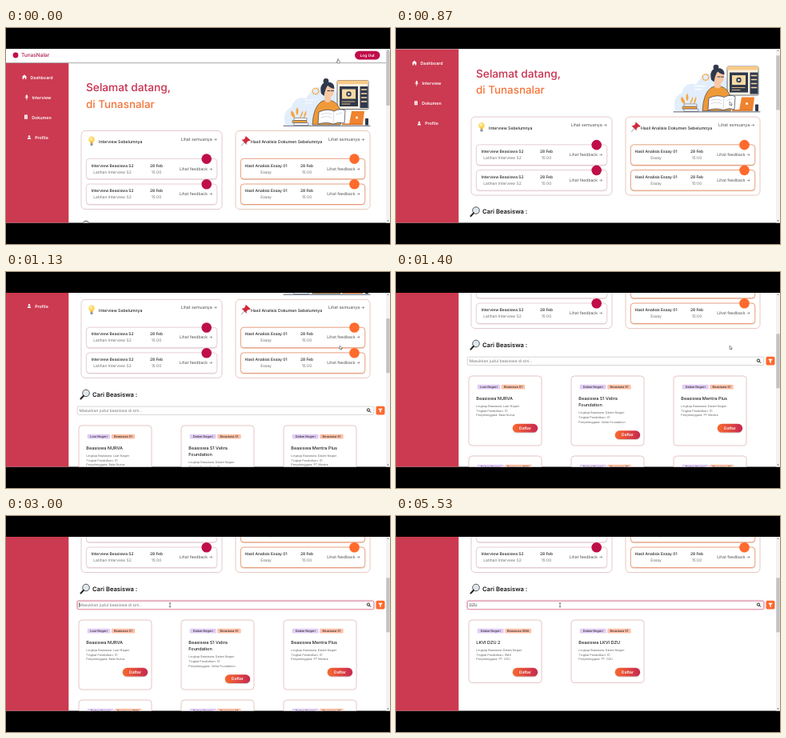
Animation of 480 by 270 pixels, one loop 5.59 s. Source, as an HTML page:

```html
<!DOCTYPE html>
<html lang="id">
<head>
<meta charset="utf-8">
<title>Dasbor beasiswa</title>
<style>
html, body { margin: 0; width: 100%; height: 100%; overflow: hidden; background: #000; }
svg { display: block; width: 100vw; height: 100vh; }
text { font-family: Inter, "Open Sans", sans-serif; text-rendering: geometricPrecision; white-space: pre; }
</style>
</head>
<body>
<svg id="stage" viewBox="0 0 480 270"></svg>
<script>
const LOOP = 5590;
const STEP = 1000 / 15;
const CRIMSON = '#bf0e48', ORANGE = '#fb6930', INK = '#222', GREY = '#707070', NAVY = '#30394c';

const attrs = o => Object.entries(o).map(([k, v]) => ` ${k}="${v}"`).join('');
const rect = (x, y, width, height, fill, more = {}) =>
  `<rect${attrs({ x, y, width, height, fill, ...more })}/>`;
const circle = (cx, cy, r, fill, more = {}) => `<circle${attrs({ cx, cy, r, fill, ...more })}/>`;
const path = (d, fill, more = {}) => `<path${attrs({ d, fill, ...more })}/>`;
const line = (d, stroke, width = 0.8, more = {}) =>
  path(d, 'none', { stroke, 'stroke-width': width, 'stroke-linecap': 'round', ...more });
// y is the optical middle of the line of text
const text = (x, y, str, size, fill = INK, weight = 400, anchor = 'start') =>
  `<text${attrs({ x, y: y + size * 0.36, fill, 'font-size': size, 'font-weight': weight, 'text-anchor': anchor })}>${str}</text>`;
const mid = (x, y, str, size, fill, weight) => text(x, y, str, size, fill, weight, 'middle');
const box = (x, y, w, h, rx, stroke, width = 0.7) =>
  rect(x, y, w, h, '#fff', { rx, stroke, 'stroke-width': width });

function header() {
  return rect(0, 26, 475, 17.3, '#fff') + rect(0, 43, 475, 0.9, '#a8a8a8') + rect(78.3, 43.9, 397, 0.8, '#ececec') +
    circle(12, 34, 3.4, CRIMSON) + text(19, 34, 'TunasNalar', 6.5, '#a8174a', 500) +
    rect(436, 28.8, 31.5, 10.6, CRIMSON, { rx: 5.3 }) + mid(451.7, 34, 'Log Out', 4.8, '#fff', 600);
}

function sidebar() {
  const item = (x, y, label) => mid(x, y, label, 5.3, '#fff', 600);
  return rect(0, 43.8, 78.3, 500, '#cb3a50') +
    path('M19.8 61.3L23 58.3L26.2 61.3H25.3V64H23.8V62H22.2V64H20.7V61.3Z', '#fff') +
    item(44.5, 62, 'Dashboard') +
    rect(24.7, 83.4, 2.2, 4.2, '#fff', { rx: 1.1 }) +
    line('M23.9 86.6Q25.8 90 27.7 86.6M25.8 88.4V89.8', '#fff', 0.6) + item(44.5, 87, 'Interview') +
    rect(23, 108.6, 4, 5.2, '#fff', { rx: 0.5 }) + line('M24.2 110.2H26M24.2 112H26', '#cb3a50', 0.5) +
    item(44.5, 112, 'Dokumen') +
    circle(29, 135.4, 1.2, '#fff') + path('M26.8 139Q27 136.8 29 136.8Q31 136.8 31.2 139Z', '#fff') +
    item(44.5, 137, 'Profile');
}

function illustration() {
  const book = (x, y, w, fill) =>
    rect(x, y, w, 3, fill, { rx: 0.6, stroke: NAVY, 'stroke-width': 0.5 });
  const leaf = (x, y, lean) =>
    path(`M${x} ${y}q${lean - 3} -4 ${lean} -10q${3 - lean / 2} 5 ${-lean} 10Z`, '#f5a53c');
  return path('M349 121Q345 104 357 99Q361 84 375 88Q386 70 401 74Q420 78 420 100L418 122Z', '#e2eefb') +
    rect(414, 65.5, 39, 36, '#fbf1df', { rx: 1.5, stroke: NAVY, 'stroke-width': 0.7 }) +
    rect(414, 65.5, 39, 4.5, '#f8c987', { rx: 1 }) +
    rect(417, 73, 23, 25, NAVY) + rect(420, 76.5, 17, 12, '#f8d9a4') +
    circle(428.5, 82.5, 3.2, NAVY) + path('M427.5 80.8L430.6 82.5L427.5 84.2Z', '#fff') +
    line('M420 92H436M420 95H430', '#f8c987', 0.9) +
    rect(442.5, 73, 10, 27, NAVY) + line('M444.5 77H450.5M444.5 82H450.5M444.5 87H450.5M444.5 92H450.5', '#f8d9a4', 1.6) +
    circle(387, 79, 3.8, 'none', { stroke: '#f5a53c', 'stroke-width': 1.6, 'stroke-dasharray': '1.8 .7' }) +
    line('M374 90H386M374 94H382', '#fff', 1.2) +
    leaf(361, 113, -4) + leaf(364, 109, 0) + leaf(367, 113, 4) + leaf(372, 113, 3) +
    book(360, 112.5, 16, '#fff') + book(358, 115.6, 18, '#f5a53c') + book(360, 118.7, 18, '#fff') +
    path('M383 121Q384 99 394 92Q402 88 410 92Q418 97 420 112L418 121Z', '#ef9a38', { stroke: NAVY, 'stroke-width': 0.6 }) +
    path('M398 84H406V91Q402 95 398 91Z', '#f9c8a4') +
    path('M396 76Q396 69 403 69Q410 69 410 77Q410 86 404 87Q397 86 396 76Z', '#f9c8a4') +
    circle(400, 66.5, 3.4, NAVY) +
    path('M394 82Q391 69 401 67.5Q411 67 410.5 76Q405 75 402 72Q399 76 397.5 85Z', NAVY) +
    line('M402 78.5H405M406.5 78.5H409.5', NAVY, 1) +
    path('M391 105Q402 100 410 104Q417 100 424 103L423 119Q416 117 409 120Q401 117 390 120Z', '#fff', { stroke: NAVY, 'stroke-width': 0.7 }) +
    line('M410 104L409 120M394 108Q401 105 407 108M394 112Q401 109 407 112M413 108L420 106', '#a9b4c6', 0.5) +
    path('M432 104H448L446 120H429Z', '#f0832e') + circle(438.5, 112, 1.5, '#fff') +
    rect(420, 119.4, 26, 1.8, '#d9742a') + rect(449, 113, 4, 8.4, NAVY, { rx: 0.6 }) +
    line('M347 122.3H455', NAVY, 0.8);
}

function panel(p) {
  const row = y => rect(p.x + 6.3, y + 0.8, p.w - 12.5, 26, p.shade, { rx: 4, opacity: 0.5 }) +
    box(p.x + 6.3, y, p.w - 12.5, 25.5, 4, p.edge, p.edgeWidth) +
    mid(p.col, y + 8.5, p.name, 4.95, INK, 500) + mid(p.col, y + 16.5, p.kind, 4.95, GREY) +
    mid(p.date, y + 8.5, '28 Feb', 4.95, INK, 500) + mid(p.date, y + 16.5, '15:00', 4.95, GREY) +
    mid(p.more, y + 12.4, 'Lihat feedback →', 5.05, '#505050') + circle(p.dot, y + 0.3, 6.3, p.fill);
  return box(p.x, 128.5, p.w, 98, 5, p.frame) +
    text(p.titleX, 142.6, p.title, 5.15, INK, 500) + mid(p.more + 3.8, 138.6, 'Lihat semuanya →', 5.3, '#505050') +
    row(163.3) + row(195);
}

function icons() {
  return circle(107, 139.4, 3.8, '#ffd968') + circle(106, 138.2, 1.5, '#fff3b8') +
    path('M105 142H109L108.5 144H105.5Z', '#f2b93c') + rect(105.4, 144, 3.2, 3, '#8b98a5', { rx: 0.8 }) +
    line('M298.5 142.5L294.5 147', '#7d8790', 0.8) +
    path('M300 135.2L305.6 140.2L304 141.5L302.8 141L300.6 143.4L300.8 146L294.4 139.6L297 139.5L299.4 137.2L299 136Z', '#cf2a3c') +
    circle(100, 245.5, 4.3, '#dfe8ee', { stroke: '#555', 'stroke-width': 1 }) +
    line('M97 248.8L93.4 252.6', '#222', 2);
}

function searchBar() {
  return rect(89, 262, 371, 10.6, '#f0537f', { id: 'glow', rx: 2, filter: 'url(#soft)' }) +
    box(89.2, 262.2, 370.6, 10.3, 1.5, '#bbb', 0.6) +
    rect(89.2, 262.2, 370.6, 10.3, 'none', { id: 'focusEdge', rx: 1.5, stroke: '#e58aa4', 'stroke-width': 0.8 }) +
    `<g id="hint">${text(91.5, 267.2, 'Masukkan judul beasiswa di sini...', 4.95, '#777')}</g>` +
    `<g id="query">${text(91.5, 267.2, '', 4.8, INK)}</g>` +
    rect(91.5, 264.2, 0.6, 6, '#111', { id: 'caret' }) +
    circle(453, 266.6, 1.7, 'none', { stroke: '#111', 'stroke-width': 0.9 }) + line('M454.4 268L455.8 269.4', '#111', 1) +
    rect(462.5, 261.8, 11, 10.8, ORANGE, { rx: 1.8 }) +
    path('M465.3 264.8H470.7L468.7 267.4V270.2L467.3 269.2V267.4Z', '#fff');
}

function card(x, y, h, { region, level, title, host }) {
  const wide = region === 'Dalam' ? 33 : 28.5;
  const badge = level === 'SMA' ? 33 : 29.5;
  const tagX = x + 10.7;
  const drop = (title.length - 1) * 8.5;
  const tag = (left, w, fill, label) =>
    rect(left, y + 10.8, w, 5.8, fill, { rx: 1.2 }) + mid(left + w / 2, y + 13.7, label, 3.9, '#333', 500);
  const details = [`Lingkup Beasiswa: ${region} Negeri`, `Tingkat Pendidikan: ${level}`, `Penyelenggara: ${host}`];
  return box(x, y, 91, h, 4, '#d9b0ae') +
    tag(tagX, wide, '#e1cdf6', `${region} Negeri`) + tag(tagX + wide + 1.5, badge, '#ffc1a8', `Beasiswa ${level}`) +
    title.map((s, i) => text(x + 9.3, y + 27.7 + i * 8.7, s, 5.5, INK, 500)).join('') +
    details.map((s, i) => text(x + 9.3, y + 37.5 + drop + i * 5.8, s, 3.7, '#666')).join('') +
    rect(x + 54.7, y + 60.7 + drop, 31.5, 10.8, '#000', { rx: 5.4, opacity: 0.15 }) +
    rect(x + 54.7, y + 59.8 + drop, 31.5, 10.8, 'url(#warm)', { rx: 5.4 }) +
    mid(x + 70.4, y + 65.2 + drop, 'Daftar', 4.9, '#fff', 600);
}

const columns = [91, 219, 347];
const offers = [
  { region: 'Luar', level: 'S1', title: ['Beasiswa NURVA'], host: 'Balai Nurva' },
  { region: 'Dalam', level: 'S1', title: ['Beasiswa S1 Velira', 'Foundation'], host: 'Velira Foundation' },
  { region: 'Dalam', level: 'S1', title: ['Beasiswa Mentra Plus'], host: 'PT Mentra' },
];
const matches = [
  { region: 'Dalam', level: 'SMA', title: ['LKVI DZU 2'], host: 'PT. DZU' },
  { region: 'Dalam', level: 'S1', title: ['Beasiswa LKVI DZU'], host: 'PT. DZU' },
];
const nextRow = [matches[0], matches[1], offers[2]];
const cards = (list, y, h) => list.map((c, i) => card(columns[i], y, h, c)).join('');

const interviews = {
  x: 94, w: 176, col: 133, date: 188, more: 237.5, dot: 250.7, titleX: 116, title: 'Interview Sebelumnya',
  name: 'Interview Beasiswa S2', kind: 'Latihan Interview S2',
  fill: CRIMSON, frame: '#d6b4b8', edge: '#e0c3ca', edgeWidth: 0.8, shade: '#dcc6cb',
};
const essays = {
  x: 287, w: 168, col: 325, date: 376, more: 422, dot: 435.5, titleX: 306, title: 'Hasil Analisis Dokumen Sebelumnya',
  name: 'Hasil Analisis Essay 01', kind: 'Essay',
  fill: '#ff6a2d', frame: '#dfb0a2', edge: '#e4956f', edgeWidth: 0.9, shade: '#dfa58b',
};

const stage = document.getElementById('stage');
stage.innerHTML = `<defs>
  <clipPath id="view">${rect(0, 26, 480, 217.5, '#fff')}</clipPath>
  <linearGradient id="warm"><stop offset="0" stop-color="#f8692f"/><stop offset="1" stop-color="#c72850"/></linearGradient>
  <filter id="soft" x="-5%" y="-60%" width="110%" height="220%"><feGaussianBlur stdDeviation="1.3"/></filter>
</defs>
${rect(0, 0, 480, 270, '#000')}
<g clip-path="url(#view)">
  ${rect(0, 26, 480, 218, '#fff')}
  <g id="page">
    ${sidebar() + header()}
    ${text(100, 74.3, 'Selamat datang,', 13.7, '#c8304f', 500)}
    ${text(100, 94.8, 'di Tunasnalar', 13.4, '#f4743a', 500)}
    ${illustration() + panel(interviews) + panel(essays) + icons()}
    ${text(108, 247, 'Cari Beasiswa :', 7.6, '#111', 600)}
    ${searchBar()}
    <g id="all">${cards(offers, 286, 87) + cards(nextRow, 386, 87)}</g>
    <g id="found">${cards(matches, 286, 78.5)}</g>
  </g>
  ${rect(475, 26, 5, 218, '#f3f3f3')}
  ${path('M476.3 28.6L477.5 27.2L478.7 28.6ZM476.3 240.6L477.5 242L478.7 240.6Z', '#555')}
  ${rect(475.3, 29, 4.4, 68, '#c3c3c3', { id: 'thumb' })}
  <g id="pointer">
    ${path('M0 0L0 4.6L1.1 3.7L1.9 5.3L2.7 4.9L2 3.4L3.4 3.3Z', '#fff', { id: 'arrow', stroke: '#333', 'stroke-width': 0.5 })}
    ${path('M-.6 -2.2Q0 -2.8 .5 -2.2V-.4L2.2 .2Q2.6 1.6 1.8 3H-.6L-2 .9L-.6 1Z', '#fff', { id: 'hand', stroke: '#333', 'stroke-width': 0.5 })}
    ${line('M-.9 -2.4H.9M0 -2.4V2.4M-.9 2.4H.9', '#333', 0.6, { id: 'beam' })}
  </g>
</g>`;

const el = id => document.getElementById(id);
const ui = Object.fromEntries(['page', 'thumb', 'glow', 'focusEdge', 'hint', 'caret', 'all', 'found',
  'pointer', 'arrow', 'hand', 'beam'].map(id => [id, el(id)]));
const query = el('query').firstChild;

const clamp = v => Math.min(1, Math.max(0, v));
const show = (node, on) => node.setAttribute('visibility', on ? 'visible' : 'hidden');

// keys: [time, value] pairs, joined by straight segments
function track(keys, t) {
  const i = keys.findIndex(k => k[0] > t);
  if (i === 0) return keys[0][1];
  if (i < 0) return keys[keys.length - 1][1];
  const [[t0, a], [t1, b]] = [keys[i - 1], keys[i]];
  return a + (b - a) * (t - t0) / (t1 - t0);
}

const scrollKeys = [[670, 0], [730, 2], [800, 8], [867, 17.5], [1000, 56], [1133, 94], [1270, 137], [1400, 156]];
const pointerX = [[0, 415], [330, 417], [1600, 417], [1900, 360], [2330, 200], [2530, 200], [2760, 205]];
const pointerY = [[0, 41], [330, 92], [1600, 92], [1900, 120], [2330, 150], [2530, 150], [2760, 111.3]];
const keyTimes = [3790, 3860, 3930];
const caretSpans = [[2800, 3260], [3790, 4460], [4990, 5530]];
const FILTERED = 4190;

function draw(now) {
  // the picture advances fifteen times a second
  const t = Math.floor((now % LOOP + 5) / STEP) * STEP;
  const scroll = track(scrollKeys, t);
  ui.page.setAttribute('transform', `translate(0 ${-scroll})`);
  ui.thumb.setAttribute('y', 29 + scroll * 0.31);

  const focus = clamp((t - 2780) / 150);
  ui.glow.setAttribute('opacity', focus * 0.75);
  ui.focusEdge.setAttribute('opacity', focus);

  const typed = 'DZU'.slice(0, keyTimes.filter(k => t >= k).length);
  query.textContent = typed;
  show(ui.hint, !typed);
  ui.caret.setAttribute('x', 91.5 + (typed ? query.getComputedTextLength() + 0.3 : 0));
  show(ui.caret, caretSpans.some(([from, to]) => t >= from && t < to));

  show(ui.all, t < FILTERED);
  show(ui.found, t >= FILTERED);

  ui.pointer.setAttribute('transform', `translate(${track(pointerX, t)} ${track(pointerY, t)})`);
  show(ui.hand, t < 60);
  show(ui.arrow, t >= 60 && t < 2690);
  show(ui.beam, t >= 2690);
}

const start = performance.now();
function tick() {
  draw(performance.now() - start);
  requestAnimationFrame(tick);
}
tick();
</script>
</body>
</html>
```
